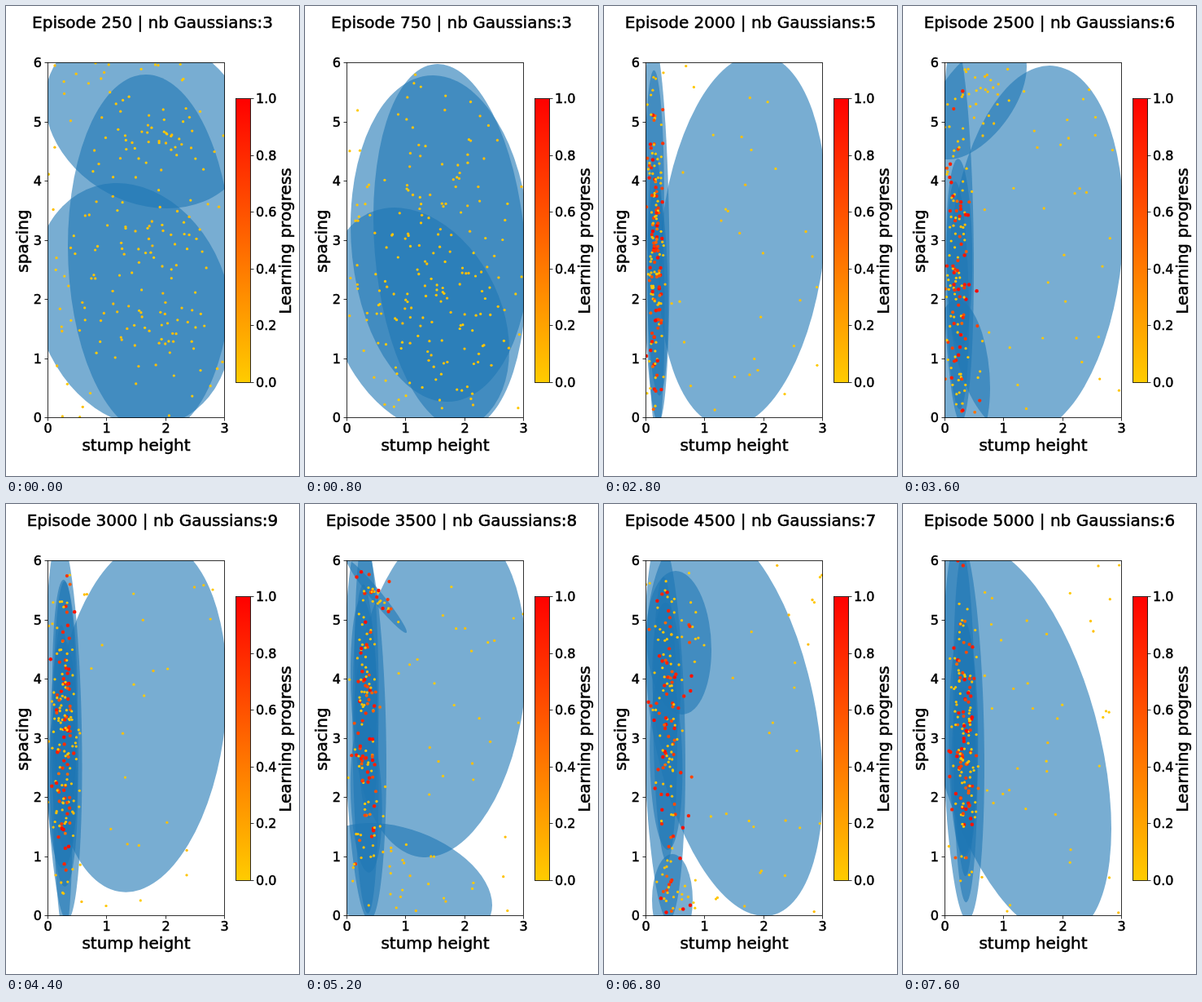
An HTML page for the animation above (8 s loop, 360 by 576 pixels).

```html
<!DOCTYPE html>
<html lang="en">
<head>
<meta charset="utf-8">
<title>Gaussian sampling</title>
<style>
  html, body { margin: 0; width: 100%; height: 100%; overflow: hidden; background: #fff; }
  svg { display: block; width: 360px; height: 576px; }
  text { font-family: "DejaVu Sans", sans-serif; font-size: 20px; text-anchor: middle; stroke: #000; stroke-width: .5px; }
  #ticks text { font-size: 16px; }
  .line { fill: none; stroke: #000; stroke-width: .8; }
</style>
</head>
<body>
<svg viewBox="0 0 360 576">
  <defs>
    <clipPath id="box"><rect x="51" y="69" width="218" height="436"/></clipPath>
    <linearGradient id="heat" x2="0" y2="1">
      <stop stop-color="#f00"/><stop offset="1" stop-color="#fc0"/>
    </linearGradient>
  </defs>
  <g clip-path="url(#box)">
    <g id="blobs" fill="#1f77b4" fill-opacity=".6"></g>
    <g id="dots"></g>
  </g>
  <rect x="282.5" y="113.5" width="18" height="348" fill="url(#heat)" stroke="#000" stroke-width=".8"/>
  <rect class="line" x="51.5" y="69.5" width="217" height="435"/>
  <g id="ticks"></g>
  <text id="title" x="180" y="27"></text>
  <text x="160" y="545">stump height</text>
  <text transform="translate(27 288) rotate(-90)">spacing</text>
  <text transform="translate(350 288) rotate(-90)">Learning progress</text>
</svg>
<script>
const $ = id => document.getElementById(id);
const STEP = 400, STEPS = 20;
const LEFT = 51, TOP = 69, RIGHT = 268.5, BOTTOM = 504;

// Key poses: step, blob count, then the wide, upper and lower blob,
// each as centre x, y, half width, half height, correlation.
const keys = [];
const key = (step, count, ...blobs) => keys.push({ step, count, blobs });
key(0, 3, [173, 138, 125, 110, .2], [177, 305, 101, 221, .05], [156, 366, 122, 149, .16]);
key(2, 3, [178, 295, 94, 224, .16], [166, 285, 110, 200, .08], [140, 385, 111, 138, .27]);
key(5, 4, [178, 275, 98, 230, -.2]);
key(9, 6, [163, 300, 108, 227, -.16], [90, 115, 62, 73, -.55], [73, 450, 34, 90, .2]);
key(12, 10, [166, 240, 106, 210, -.17]);
key(13, 8, [166, 228, 106, 205, -.17], [88, 113, 37, 45, .97], [120, 465, 110, 74, .36]);
key(17, 7, [160, 265, 109, 240, .34], [92, 170, 40, 88, .1], [84, 485, 25, 56, 0]);
key(19, 6, [140, 290, 116, 240, .45]);

const clamp = (v, lo, hi) => Math.min(hi, Math.max(lo, v));
const lerp = (a, b, t) => a + (b - a) * t;

function random(seed) {
  return () => {
    seed = seed + 0x6D2B79F5 | 0;
    let t = Math.imul(seed ^ seed >>> 15, seed | 1);
    t ^= t + Math.imul(t ^ t >>> 7, t | 61);
    return ((t ^ t >>> 14) >>> 0) / 4294967296;
  };
}

// Blend the key blobs, then fill up with narrow ones around a spine on the left.
function blobsAt(step, rnd) {
  const next = keys.find(k => k.step >= step);
  const last = keys.findLast(k => k.step <= step);
  const mix = next === last ? 0 : (step - last.step) / (next.step - last.step);
  const count = Math.round(lerp(last.count, next.count, mix));
  const shared = Math.min(last.blobs.length, next.blobs.length);
  const blobs = last.blobs.slice(0, shared)
    .map((b, i) => b.map((v, j) => lerp(v, next.blobs[i][j], mix)));

  const grow = clamp((step - 5) / 8, 0, 1);
  const x = lerp(60, 74, grow), w = lerp(14, 26, grow);
  if (blobs.length < count) blobs.push([x, 275, w, 235, .2]);
  while (blobs.length < count) {
    blobs.push([x + 6 * (rnd() - .5), lerp(210, 370, rnd()), w * lerp(.5, .85, rnd()), lerp(90, 210, rnd()), .2 * rnd()]);
  }
  return blobs;
}

// Unit circle to tilted ellipse
const matrix = ([x, y, w, h, r]) => [w, r * h, 0, h * Math.sqrt(1 - r * r), x, y];

function sample(blob, rnd) {
  const [a, b, , d, e, f] = matrix(blob);
  let x, y, tries = 0;
  do {
    const r = .47 * Math.sqrt(-2 * Math.log(1 - rnd())), t = rnd() * 2 * Math.PI;
    x = a * r * Math.cos(t) + e;
    y = b * r * Math.cos(t) + d * r * Math.sin(t) + f;
  } while ((x < LEFT || x > RIGHT || y < TOP || y > BOTTOM) && ++tries < 4);
  return [clamp(x, LEFT, RIGHT), clamp(y, TOP, BOTTOM)];
}

function dotsAt(step, blobs, rnd) {
  const heat = clamp((step - 2) / 3, 0, 1);
  let out = '';
  for (let i = 0; i < 200; i++) {
    const stray = rnd() < .2;
    const blob = blobs[heat ? 1 + i % (blobs.length - 1) : i % blobs.length];
    const [x, y] = stray ? [lerp(LEFT, RIGHT, rnd()), lerp(TOP, BOTTOM, rnd())] : sample(blob, rnd);
    const hot = !stray && blob[2] < 60 && rnd() < .5 * heat;
    const lp = hot ? .35 + .6 * Math.sqrt(rnd()) : .08 * rnd();
    out += `<circle cx="${x.toFixed(1)}" cy="${y.toFixed(1)}" r="${1.6 + .7 * lp}"
      fill="rgb(255,${Math.round(204 * (1 - lp))},0)"/>`;
  }
  return out;
}

function drawTicks() {
  let out = '';
  const tick = (x, y, dx, dy, tx, ty, anchor, label) => {
    out += `<path class="line" d="M${x} ${y}l${dx} ${dy}"/>
      <text x="${x + tx}" y="${y + ty}" style="text-anchor:${anchor}">${label}</text>`;
  };
  for (let i = 0; i <= 3; i++) tick(Math.round(LEFT + i * 72.4) + .5, 504.5, 0, 4, 0, 18.5, 'middle', i);
  for (let i = 0; i <= 6; i++) tick(51.5, Math.round(BOTTOM - i * 72.5) + .5, -4, 0, -7.5, 5.5, 'end', i);
  for (let i = 0; i <= 5; i++) tick(300.5, Math.round(461 - i * 69.6) + .5, 4, 0, 6.5, 5.5, 'start', (i / 5).toFixed(1));
  $('ticks').innerHTML = out;
}

function draw(step) {
  const rnd = random(step * 97 + 11);
  const blobs = blobsAt(step, rnd);
  $('title').textContent = `Episode ${(step + 1) * 250} | nb Gaussians:${blobs.length}`;
  $('blobs').innerHTML = blobs.map(b => `<circle r="1" transform="matrix(${matrix(b)})"/>`).join('');
  $('dots').innerHTML = dotsAt(step, blobs, rnd);
}

let shown = -1;
const start = performance.now();
function frame() {
  const step = Math.floor((performance.now() - start) / STEP) % STEPS;
  if (step !== shown) draw(shown = step);
  requestAnimationFrame(frame);
}
drawTicks();
frame();
</script>
</body>
</html>
```
